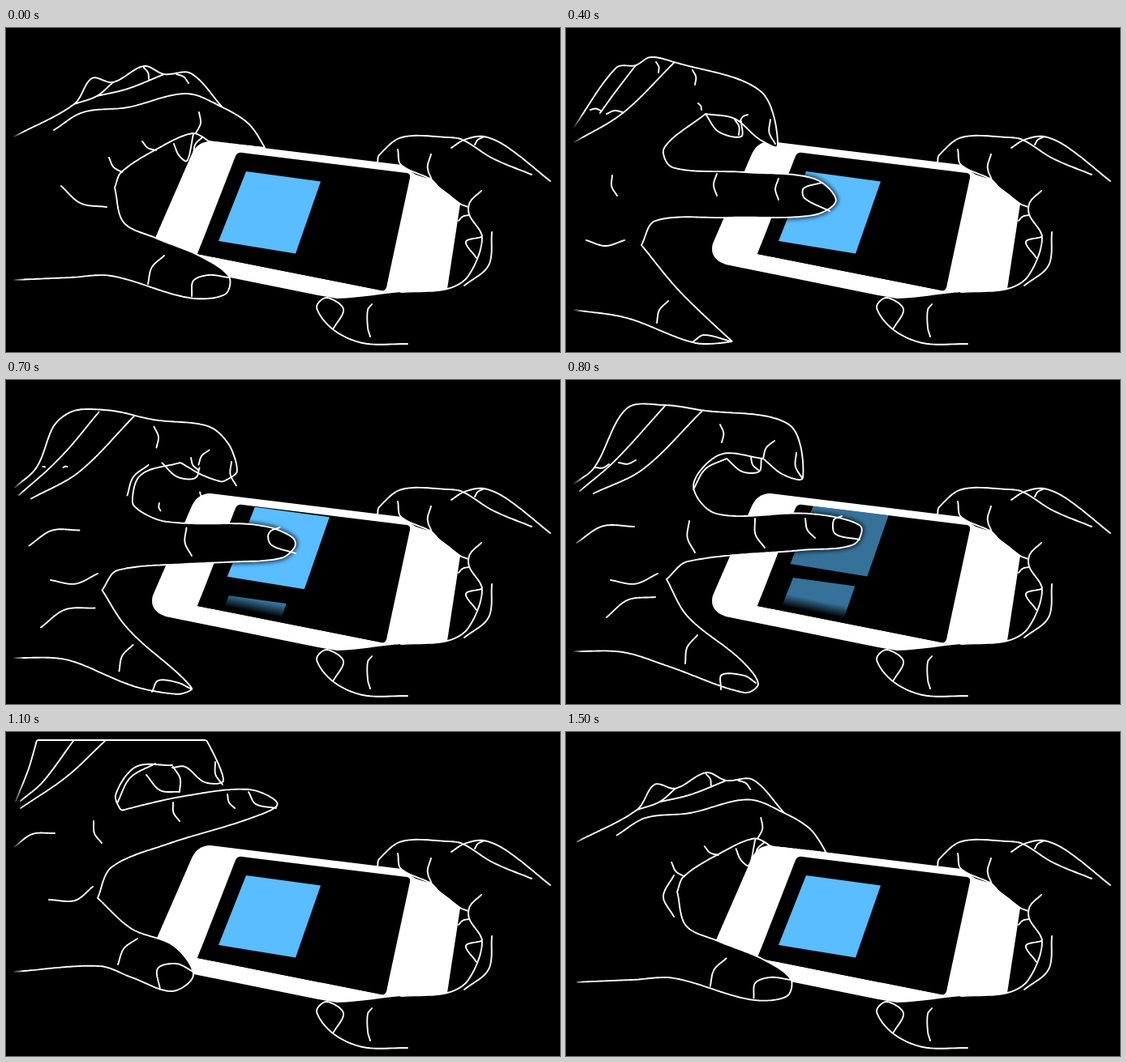
Write an HTML page that moves like this. It is 683 px wide and 400 px high and loops after 1600 ms.

```html
<!DOCTYPE html>
<html lang="en">
<head>
<meta charset="utf-8">
<title>Swipe gesture</title>
<style>
html, body { margin: 0; width: 100%; height: 100%; overflow: hidden; background: #000; }
svg { display: block; width: 100vw; height: 100vh; }
.line { fill: none; stroke: #fff; stroke-width: 1.9; stroke-linecap: round; stroke-linejoin: round; }
.tile { fill: #5abdff; }
</style>
</head>
<body>
<svg viewBox="0 0 683 400">
  <defs>
    <clipPath id="screen"><path d="M291 154L494 179Q499 180 498 185L469 320Q467 325 463 324L236 279L283 158Q286 153 291 154Z"/></clipPath>
    <linearGradient id="low" gradientUnits="userSpaceOnUse" x1="300" y1="270" x2="297" y2="285">
      <stop offset="0" stop-opacity="0"/><stop offset="1"/>
    </linearGradient>
    <linearGradient id="edge"><stop offset="0"/><stop offset="1" stop-opacity="0"/></linearGradient>
    <filter id="soft" x="-10%" y="-10%" width="120%" height="120%"><feGaussianBlur stdDeviation="2"/></filter>
  </defs>
  <rect width="683" height="400"/>
  <path fill="#fff" d="M252 140L488 169L505 181L524 187C533 197 548 205 560 217L544 322Q530 325 510 325L487 326C460 328 440 333 408 334L385 330L197 292Q176 285 181 266L228 158Q235 140 252 140Z"/>
  <g clip-path="url(#screen)">
    <rect width="683" height="400"/>
    <polygon class="tile" id="tileA"/>
    <polygon class="tile" id="tileB"/>
    <path fill="url(#low)" d="M230 255L480 303V340H230Z"/>
    <path id="shade" fill="none" stroke="#000" stroke-width="7" opacity=".55" filter="url(#soft)"/>
  </g>
  <path id="right" class="line"/>
  <path id="curl"/>
  <path id="body"/>
  <path id="left" class="line"/>
  <rect x="8" width="14" height="400" fill="url(#edge)"/>
  <rect width="8" height="400"/>
</svg>
<script>
const $ = id => document.getElementById(id);
const LOOP = 1600, STEP = 100, COUNT = 160, SAG = .15;

// Each stroke is a smooth curve through a few points. A doubled point is a corner,
// and a stroke of only two points bends slightly to its left.
const right = [
  '458,166 460,157 488,135 545,135 563,138 600,161 648,181',
  '549,148 565,138 589,134 618,147 671,189',
  '578,144 588,135',
  '483,150 487,169 524,187 535,198 560,217 570,221',
  '525,188 524,156',
  '586,201 572,215 571,230 587,259 570,306 544,322 487,326',
  '558,238 571,231',
  '586,258 567,264 580,284',
  '599,252 595,293 565,318',
  '403,372 416,347 395,333 383,345 403,372 440,389 495,390',
  '449,381 446,370 446,348 451,341'
];

const hold = {
  index: '59,126 95,104 150,98 222,81 267,98 300,119 319,148 319,148 250,140 250,140 230,130 185,150 142,178 134,197',
  thumb: '134,197 145,240 184,259 240,282 275,307 270,329 225,333 130,306 80,308 10,311',
  top: '10,134 84,94 106,62 132,67 170,47 195,57 228,56 267,98',
  ridge: '84,94 112,84 132,67',
  ridge2: '112,84 150,75 195,57',
  thumbNail: '229,331 231,312 250,305 274,308',
  thumbFold: '175,316 195,281',
  palm: '124,221 68,195',
  marks: ['170,49 176,63', '210,57 225,68', '185,151 168,140', '143,178 127,160',
    '238,104 234,130', '207,143 213,157 223,164 231,131', '231,155 242,135']
};

const lift = {
  index: '71,98 125,88 200,75 257,79 300,96 324,123 304,135 225,136 150,156 88,187 85,194',
  thumb: '85,194 108,238 190,290 223,354 223,354 175,350 120,322 60,312 10,315',
  top: '10,106 50,64 90,19 160,12 212,23 250,48 257,79',
  ridge: '50,64 98,50 160,13',
  ridge2: '125,87 160,69 215,75',
  thumbNail: '178,350 178,331 205,328 223,348',
  thumbFold: '123,320 147,286',
  palm: '77,227 23,220',
  nail: '318,130 287,117 283,106 294,95',
  marks: ['173,44 177,67', '214,77 226,63', '188,141 181,125', '127,161 114,145',
    '248,120 249,133', '38,184 84,182']
};

const press = {
  index: '172,106 121,148 131,172 220,178 306,186 333,213 305,231 200,234 110,238 93,268',
  thumb: '93,268 140,325 205,387 205,387 160,389 75,358 10,348',
  top: '10,122 62,49 86,46 104,36 133,42 240,78 261,146 238,137 208,112 172,106',
  ridge: '42,105 60,80 86,46',
  ridge2: '10,141 70,105 133,43',
  thumbNail: '157,387 170,379 204,387',
  thumbFold: '112,364 126,337',
  palm: '72,262 25,262',
  nail: '325,226 294,210 293,198 315,191',
  marks: ['111,42 114,55', '156,52 159,70', '186,207 186,180', '63,207 57,182',
    '262,212 262,186', '172,106 188,128 216,134 216,115', '258,143 252,113',
    '30,101 43,102', '50,106 70,104', '163,93 167,101', '215,114 224,107', '208,113 213,132']
};

const drag = {
  index: '187,107 143,145 154,181 154,181 250,187 330,196 358,219 325,236 210,240 125,246 113,273',
  thumb: '113,273 165,340 222,388 222,388 150,388 75,354 10,351',
  top: '12,137 40,108 62,53 125,43 190,60 260,72 278,120 278,142 240,127 187,107',
  ridge: '15,147 70,95 107,47',
  ridge2: '28,153 85,117 149,50',
  thumbNail: '169,388 185,378 221,388',
  thumbFold: '132,369 151,339',
  palm: '36,318 109,295',
  nail: '352,231 322,217 318,203 335,196',
  marks: ['142,150 153,113', '175,60 179,90', '213,227 212,194', '44,208 97,190',
    '182,97 183,106', '187,108 205,126 230,130 236,120', '277,140 272,112',
    '38,110 60,107', '55,117 86,112', '222,110 226,130', '232,112 244,98']
};

const swipe = {
  index: '243,97 190,92 157,130 185,165 300,165 363,180 355,203 290,210 150,224 124,246',
  thumb: '124,246 150,292 215,345 237,375 220,386 125,353 70,336 10,335',
  top: '10,128 35,108 75,35 122,31 165,37 275,55 292,121 268,117 243,97',
  ridge: '17,137 60,100 122,32',
  ridge2: '34,140 95,110 168,38',
  thumbNail: '191,382 192,364 220,365 234,374',
  thumbFold: '147,350 162,315',
  palm: '50,293 110,268',
  nail: '362,197 332,190 330,173 340,168',
  marks: ['157,135 198,97', '190,55 192,77', '245,207 233,171', '13,201 84,181',
    '307,195 295,171', '198,97 217,113 238,113 241,97', '291,121 284,90',
    '53,104 36,108', '86,99 65,102', '159,213 152,174', '243,97 257,75', '237,111 228,96', '113,239 55,247']
};

const release = {
  index: '205,41 160,43 135,78 142,97 142,97 215,80 300,71 335,89 300,107 200,138 130,167 113,205',
  thumb: '113,205 155,243 207,264 231,300 205,320 155,303 115,289 10,296',
  top: '12,85 28,45 38,10 38,10 247,10 247,10 268,60 245,62 221,43 205,44',
  ridge: '18,85 45,62 83,11',
  ridge2: '18,94 75,55 122,11',
  thumbNail: '190,318 187,292 210,286 231,296',
  thumbFold: '138,287 162,255',
  palm: '53,207 85,208 107,191',
  nail: '333,94 308,89 299,74',
  marks: ['137,88 184,39', '206,43 214,74', '214,110 206,87', '10,142 60,125',
    '282,94 273,77', '173,53 190,72 214,74', '267,65 258,37', '118,137 108,110']
};

const mix = (a, b, u) => a + (b - a) * u;
const mixPoint = (p, q, u) => [mix(p[0], q[0], u), mix(p[1], q[1], u)];
const gap = (a, b) => Math.hypot(b[0] - a[0], b[1] - a[1]);
const clamp = u => Math.max(0, Math.min(1, u));

function parse(text) {
  const p = text.split(' ').map(s => s.split(',').map(Number));
  if (p.length > 2) return p;
  const [a, b] = p, m = mixPoint(a, b, .5);
  return [a, [m[0] + SAG * (b[1] - a[1]), m[1] - SAG * (b[0] - a[0])], b];
}

function flatten(text) {
  const p = parse(text);
  const slope = p.map((q, i) => {
    const a = p[i - 1] || q, b = p[i + 1] || q;
    const before = gap(a, q), after = gap(q, b);
    const corner = (i && !before) || (i < p.length - 1 && !after);
    return corner ? [0, 0] : [0, 1].map(k => (b[k] - a[k]) / (before + after));
  });
  const out = [p[0]];
  for (let i = 1; i < p.length; i++) {
    const a = p[i - 1], b = p[i], d = gap(a, b);
    if (!d) continue;
    for (let j = 1; j <= 12; j++) {
      const u = j / 12, v = 1 - u;
      out.push([0, 1].map(k =>
        a[k] * v * v * (1 + 2 * u) + b[k] * u * u * (3 - 2 * u) +
        d * u * v * (slope[i - 1][k] * v - slope[i][k] * u)));
    }
  }
  return out;
}

// Spread points evenly along the curve so that two strokes can be blended.
function sample(text) {
  const p = flatten(text), at = [0];
  for (let i = 1; i < p.length; i++) at.push(at[i - 1] + gap(p[i - 1], p[i]));
  const total = at[at.length - 1];
  let i = 1;
  return Array.from({ length: COUNT }, (_, n) => {
    const s = total * n / (COUNT - 1);
    while (i < p.length - 1 && at[i] < s) i++;
    return mixPoint(p[i - 1], p[i], (s - at[i - 1]) / (at[i] - at[i - 1]));
  });
}

function build({ marks, ...main }) {
  const strokes = {};
  for (const name in main) strokes[name] = sample(main[name]);
  marks.forEach((m, i) => { strokes['mark' + i] = sample(m); });
  return strokes;
}

// The closing grip is the holding hand, slightly squeezed, with a fold in the palm.
function squeeze(strokes) {
  const out = {};
  for (const name in strokes) out[name] = strokes[name].map(([x, y]) => [4 + x * .993, 4 + y * .98]);
  out.palm = sample('133,228 120,203 133,177');
  return out;
}

const start = build(hold);
const poses = [
  [0, start], [200, build(lift)], [400, build(press)], [600, build(drag)],
  [800, build(swipe)], [1100, build(release)], [1500, squeeze(start)]
];

function blend(a, b, u) {
  const out = {};
  for (const name in { ...a, ...b }) {
    const p = a[name], q = b[name];
    if (p && q) out[name] = p.map((c, i) => mixPoint(c, q[i], u));
    else if (u < .5 ? p : q) out[name] = p || q;
  }
  return out;
}

function poseAt(t) {
  let i = poses.length - 1;
  while (poses[i][0] > t) i--;
  const [from, a] = poses[i], [to, b] = poses[i + 1] || [LOOP, a];
  return blend(a, b, (t - from) / (to - from));
}

const trace = p => 'M' + p.map(c => c[0].toFixed(1) + ' ' + c[1].toFixed(1)).join('L');

function placeTile(el, x, y, size, alpha) {
  const shape = [[0, 0], [92, 12.5], [61, 101.5], [-34, 86]];
  el.setAttribute('points', shape.map(([dx, dy]) => [x + dx * size, y + dy * size]).join(' '));
  el.setAttribute('opacity', alpha);
}

function drawTiles(t) {
  const moving = t < 1100;
  const push = moving ? Math.max(0, (t - 400) / 200) : 0;
  placeTile($('tileA'), 296 + 7.2 * push, 177 - 9 * push * push, 1, clamp(1.6 - push * .5 + (push > 0 ? .4 - .4 * clamp(push - 1) : 0)));
  const u = (t - 800) / 300;
  placeTile($('tileB'), mix(280, 296, u), mix(244, 177, u), mix(.83, 1, u),
    moving && t >= 700 ? mix(.6, 1, clamp(u)) : 0);
}

function draw(t) {
  const s = poseAt(t), edge = trace(s.index);
  $('curl').setAttribute('d', trace(s.top) + 'Z');
  $('body').setAttribute('d', edge + trace(s.thumb).replace('M', 'L') + 'L0 350L0 100Z');
  $('shade').setAttribute('d', edge);
  $('left').setAttribute('d', Object.values(s).map(trace).join(''));
  drawTiles(t);
}

$('right').setAttribute('d', right.map(r => trace(flatten(r))).join(''));

let shown = -1;
function tick() {
  const t = Math.floor(performance.now() % LOOP / STEP) * STEP;
  if (t !== shown) draw(shown = t);
  requestAnimationFrame(tick);
}
tick();
</script>
</body>
</html>
```
